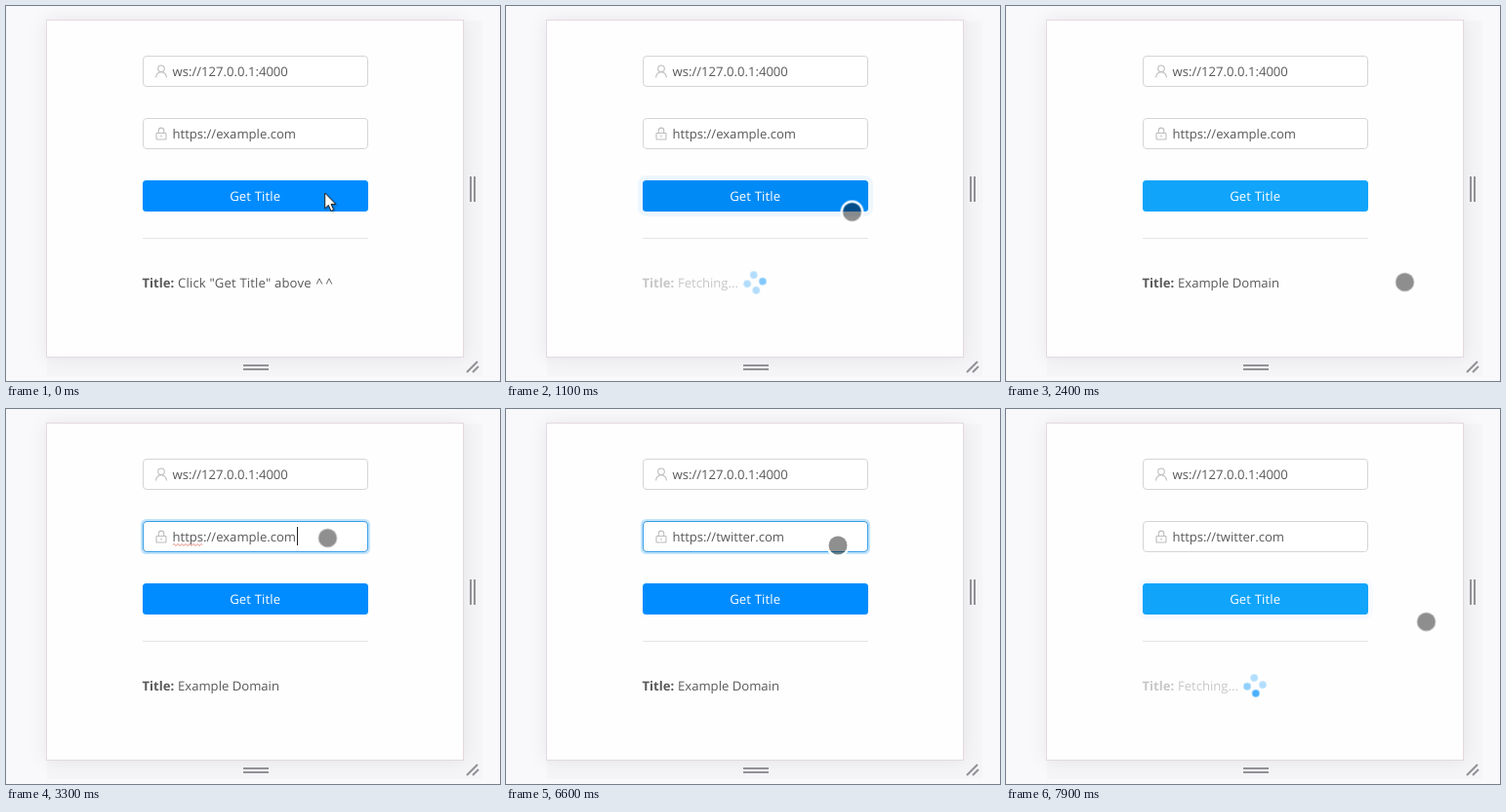
Recreate the animation shown at these times as an HTML page. Size 506 by 385 pixels, loop 8000 ms.

```html
<!DOCTYPE html>
<html lang="en">
<head>
<meta charset="utf-8">
<title>Get Title</title>
<style>
html, body { margin: 0; width: 100%; height: 100%; overflow: hidden; background: #f9f8fb; }
svg { display: block; }
text { font: 13.1px "Open Sans", "Noto Sans", sans-serif; fill: #595959; white-space: pre; text-rendering: geometricPrecision; }
.card { fill: #fefefe; stroke: #e2dae0; filter: drop-shadow(0 0 9px rgba(0, 0, 0, .07)); }
.grip { stroke: #929196; stroke-width: 2; fill: none; }
.field { fill: #fff; stroke: #d5d5d5; }
.icon { fill: none; stroke: #bdbdbd; stroke-width: 1.1; }

/* Every animation is paused and placed by the shared clock in --now. */
.anim { animation: 8s linear infinite paused; animation-delay: var(--now, 0ms); }

#button { animation-name: button; }
@keyframes button {
  0%, 10% { fill: #008cff; }
  11.25%, 15% { fill: #008af5; }
  18.75%, 38.75% { fill: #10a4fa; }
  41.25%, 90% { fill: #008cff; }
  91.25%, 93.75% { fill: #0089f7; }
  97.5%, 100% { fill: #10a4fa; }
}

#ripple { animation-name: ripple; fill: none; stroke: #008cff; }
@keyframes ripple {
  0%, 10% { stroke-width: 0; opacity: .22; }
  11.25% { stroke-width: 4px; opacity: .22; }
  12.5% { stroke-width: 8px; opacity: .12; }
  13.75% { stroke-width: 10px; opacity: .06; }
  17.5% { stroke-width: 10px; opacity: .02; }
  20% { stroke-width: 10px; opacity: 0; }
  90% { stroke-width: 0; opacity: 0; }
  91.25% { stroke-width: 4px; opacity: .24; }
  92.5% { stroke-width: 8px; opacity: .2; }
  93.75% { stroke-width: 10px; opacity: .11; }
  95% { stroke-width: 10px; opacity: .06; }
  100% { stroke-width: 10px; opacity: .015; }
}

#border { animation-name: border; fill: none; stroke: #3a9fe6; }
@keyframes border {
  0%, 40% { opacity: 0; }
  41.25%, 90% { opacity: 1; }
  95%, 100% { opacity: 0; }
}

#glow { animation-name: glow; fill: none; stroke: #bfe3fb; stroke-width: 2; }
@keyframes glow {
  0%, 40% { opacity: 0; }
  41.25%, 90% { opacity: 1; }
  92.5%, 100% { opacity: 0; }
}

#result { animation-name: result; }
@keyframes result {
  0%, 10.375% { opacity: 1; }
  13.75%, 27.5% { opacity: .33; }
  30%, 91.25% { opacity: 1; }
  92.5% { opacity: .7; }
  95%, 100% { opacity: .33; }
}

#spin { animation-name: spin; }
@keyframes spin {
  0%, 10.375% { transform: rotate(0deg); }
  27.5% { transform: rotate(411deg); }
  27.6%, 91.5% { transform: rotate(0deg); }
  100% { transform: rotate(204deg); }
}

#spin circle { fill: #0090fa; }
#d1 { animation-name: d1; }
#d2 { animation-name: d2; }
#d3 { animation-name: d3; }
#d4 { animation-name: d4; }
@keyframes d1 {
  0%, 10.375% { opacity: .3; }
  22.875% { opacity: 1; }
  27.5% { opacity: .74; }
  27.6%, 91.5% { opacity: .3; }
  100% { opacity: .776; }
}
@keyframes d2 {
  0%, 15.375% { opacity: .3; }
  27.5% { opacity: .98; }
  27.6%, 96.5% { opacity: .3; }
  100% { opacity: .496; }
}
@keyframes d3 {
  0%, 20.375% { opacity: .3; }
  27.5% { opacity: .7; }
  27.6%, 100% { opacity: .3; }
}
@keyframes d4 {
  0%, 25.375% { opacity: .3; }
  27.5% { opacity: .42; }
  27.6%, 100% { opacity: .3; }
}

#touch { animation-name: touch; }
@keyframes touch {
  0%, 2.5% { transform: translate(317px, 194.5px); }
  3.75%, 6.25% { transform: translate(314px, 199.5px); }
  7.5%, 11.25% { transform: translate(304px, 196.5px); }
  12.5% { transform: translate(324px, 200px); }
  13.75% { transform: translate(354.5px, 211.5px); }
  15% { transform: translate(384px, 233px); }
  16.25% { transform: translate(401px, 259px); }
  18.75% { transform: translate(408px, 280px); }
  20%, 31.25% { transform: translate(408.5px, 283.5px); }
  32.5% { transform: translate(384px, 242px); }
  33.75% { transform: translate(330px, 190px); }
  35%, 36.25% { transform: translate(288px, 165px); }
  37.5% { transform: translate(305px, 148px); }
  38.75% { transform: translate(322px, 137px); }
  40%, 81.25% { transform: translate(329.5px, 132.5px); }
  82.5% { transform: translate(340px, 140px); }
  83.75% { transform: translate(357px, 158px); }
  85% { transform: translate(350px, 171px); }
  86.25%, 87.5% { transform: translate(338px, 179px); }
  88.75% { transform: translate(316px, 187px); }
  90%, 92.5% { transform: translate(306.5px, 190.5px); }
  93.75% { transform: translate(345px, 191px); }
  95% { transform: translate(410px, 196px); }
  96.25% { transform: translate(464px, 205px); }
  97.5% { transform: translate(452px, 212px); }
  98.75%, 100% { transform: translate(430.5px, 218.5px); }
}
</style>
</head>
<body>
<svg width="506" height="385" viewBox="0 0 506 385">
  <rect width="506" height="385" fill="#f9f8fb"/>
  <path d="M469 15h19v346h-19zM42 361h446v19H42z" fill="#f5f4f7"/>
  <rect class="card" x="41.5" y="14.5" width="427" height="346"/>
  <path class="grip" d="M476 175v26M480 175v26M243 369h26M243 373h26M472 376l11-11M478 376l6-6"/>

  <rect class="field" x="140.5" y="51.5" width="230" height="31" rx="3.5"/>
  <g class="icon">
    <circle cx="159" cy="64.3" r="3.3"/>
    <path d="M153.6 73.5a5.4 5.8 0 0 1 10.8 0"/>
  </g>
  <text x="170.5" y="72">ws://127.0.0.1:4000</text>

  <rect id="glow" class="anim" x="139" y="114" width="233" height="34" rx="4.5"/>
  <rect class="field" x="140.5" y="115.5" width="230" height="31" rx="3.5"/>
  <rect id="border" class="anim" x="140.5" y="115.5" width="230" height="31" rx="3.5"/>
  <g class="icon">
    <rect x="154" y="130.5" width="10" height="6.5" rx=".6"/>
    <path d="M156.3 130.5v-2.7a2.7 2.7 0 0 1 5.4 0v2.7M159 132.6v2.2"/>
  </g>
  <rect id="mark" y="120" height="21" fill="#1890ff"/>
  <text id="url" x="170.5" y="136"><tspan id="scheme">https://</tspan><tspan id="host">example.com</tspan></text>
  <path id="squiggle" d="M171 139.5q1-2 2 0t2 0t2 0t2 0t2 0t2 0t2 0t2 0t2 0t2 0t2 0t2 0t2 0t2 0t2 0" fill="none" stroke="#d9796c"/>
  <rect id="caret" y="121" width="1" height="19" fill="#222"/>

  <rect id="ripple" class="anim" x="140" y="179" width="231" height="32" rx="3.5"/>
  <rect id="button" class="anim" x="140" y="179" width="231" height="32" rx="3.5"/>
  <text x="255.2" y="200" text-anchor="middle" style="fill:#fff;letter-spacing:.15px">Get Title</text>

  <path d="M140 238.5h231" stroke="#e5e5e5"/>

  <g id="result" class="anim">
    <text x="139.5" y="289" style="font-weight:700">Title:</text>
    <text id="hint" x="176" y="289" style="letter-spacing:.17px">Click "Get Title" above <tspan x="317.5" style="letter-spacing:3px">^^</tspan></text>
    <text id="answer" x="176" y="289"></text>
  </g>
  <g id="loader" transform="translate(255 284)">
    <g id="spin" class="anim">
      <circle id="d1" class="anim" cy="-8" r="3.8"/>
      <circle id="d2" class="anim" cx="8" r="3.8"/>
      <circle id="d3" class="anim" cy="8" r="3.8"/>
      <circle id="d4" class="anim" cx="-8" r="3.8"/>
    </g>
  </g>

  <path id="arrow" d="M326.7 192v15.8l3.6-3.4 2.6 6 2.7-1.2-2.6-5.8h4.8z" fill="#fff" stroke="#222" style="filter:drop-shadow(1px 1px 1px rgba(0,0,0,.3))"/>
  <g id="touch" class="anim">
    <circle r="10.7" fill="none" stroke="#fff" stroke-width="2.4"/>
    <circle id="disc" r="9.5"/>
  </g>
</svg>
<script>
const LOOP = 8000, STEP = 100;
const HOST = "twitter.com";
const KEYS = [4900, 5100, 5200, 5300, 5400, 5600, 5700, 5800, 5900, 6000, 6100];

const $ = id => document.getElementById(id);
const show = (id, on) => { $(id).style.display = on ? "" : "none"; };
const within = (t, from, to) => t >= from && t < to;

function draw(t) {
  document.documentElement.style.setProperty("--now", -t + "ms");

  // Address field
  const typed = KEYS.filter(k => t >= k).length;
  const selected = within(t, 3900, 4900);
  $("host").textContent = typed ? HOST.slice(0, typed) : "example.com";
  $("host").style.fill = selected ? "#fff" : "";
  const left = 170.5 + $("scheme").getComputedTextLength();
  const right = 170.5 + $("url").getComputedTextLength();
  $("mark").setAttribute("x", left);
  $("mark").setAttribute("width", right - left);
  $("caret").setAttribute("x", Math.round(right + .5));
  show("mark", selected);
  show("caret", within(t, 3200, 3700) || within(t, 4900, 6600) || within(t, 7100, 7200));
  show("squiggle", within(t, 3200, 3600) || within(t, 3900, 6600));

  // Result line
  const busy = within(t, 800, 2200) || t >= 7300;
  show("hint", t < 800);
  show("loader", busy);
  $("answer").textContent = t < 800 ? "" : busy ? "Fetching..." : "Example Domain";

  // Pointer
  show("arrow", t < 200);
  show("touch", t >= 200);
  $("disc").setAttribute("fill-opacity", within(t, 3600, 4300) ? .5 : .44);
}

let start, last = -1;
function tick(now) {
  start ??= now;
  const t = Math.floor((now - start) % LOOP / STEP) * STEP;
  if (t !== last) draw(last = t);
  requestAnimationFrame(tick);
}
draw(0);
requestAnimationFrame(tick);
</script>
</body>
</html>
```
